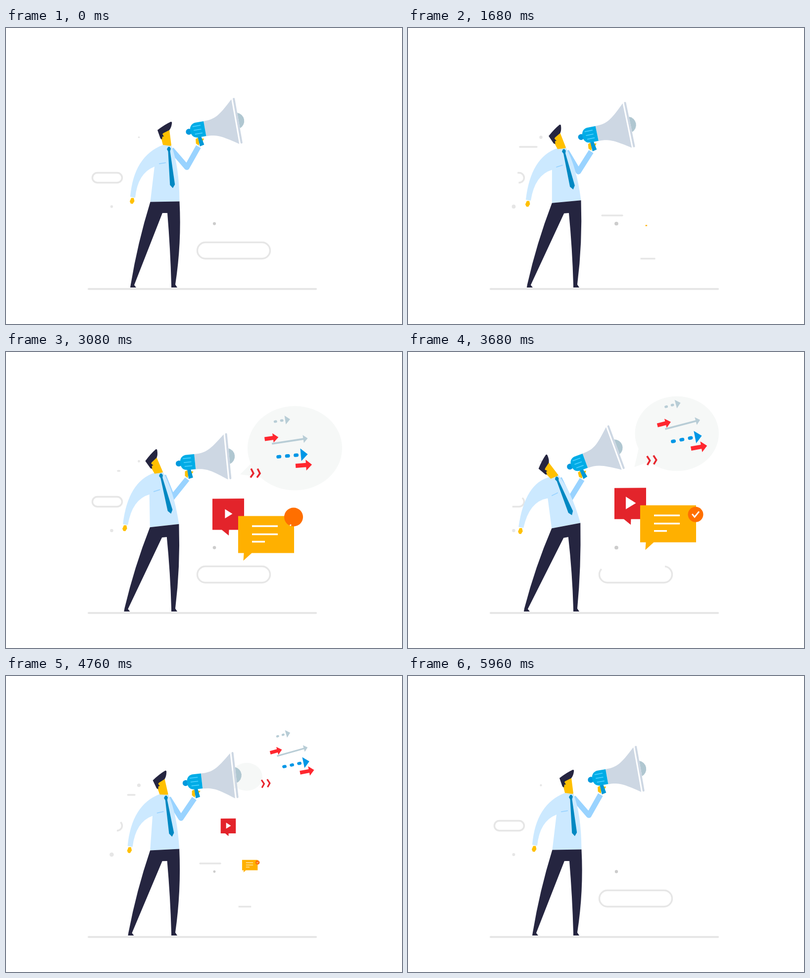
An HTML page with a canvas for the animation above (6000 ms loop, 800x600 px).

```html
<!DOCTYPE html>
<html>
<head>
<meta charset="utf-8">
<style>
html, body { margin: 0; width: 100%; height: 100%; overflow: hidden; background: #fff; }
canvas { display: block; }
</style>
</head>
<body>
<canvas id="stage" width="800" height="600"></canvas>
<script>
const c = document.getElementById('stage').getContext('2d');
const LOOP = 6000, RAD = Math.PI / 180;
const LINE = '#e6e6e6', NAVY = '#252540', SKIN = '#ffc000', SHIRT = '#cce9ff', SLEEVE = '#99d3ff',
  BLUE = '#00ace6', DEEP = '#0088c2', STEEL = '#cdd7e3', MIST = '#b8cdd6', RED = '#e3242b', HOT = '#ff272f';

function ramp(t, from, to) {
  const u = Math.min(1, Math.max(0, (t - from) / (to - from)));
  return u * u * (3 - 2 * u);
}
// Rises over the first span, falls over the second, and so on.
function wave(t, ...spans) {
  return spans.reduce((sum, [from, to], i) => sum + (i % 2 ? -1 : 1) * ramp(t, from, to), 0);
}
const sway = t => wave(t, [2560, 3080], [3080, 3860]);

function turn(x, y, deg) {
  const s = Math.sin(deg * RAD), k = Math.cos(deg * RAD);
  return [x * k - y * s, x * s + y * k];
}
function fill(color, d) { c.fillStyle = color; c.fill(new Path2D(d)); }
function stroke(color, width, d, cap = 'butt') {
  c.strokeStyle = color; c.lineWidth = width; c.lineCap = cap; c.stroke(new Path2D(d));
}
function dot(color, x, y, r) {
  c.fillStyle = color; c.beginPath(); c.arc(x, y, Math.max(0, r), 0, 7); c.fill();
}
function at(x, y, deg, scale, draw) {
  if (scale <= 0.001) return;
  c.save();
  c.translate(x, y); c.rotate(deg * RAD); c.scale(scale, scale);
  draw();
  c.restore();
}

// Rounded outline drawn from fraction s to e, starting at the middle of its top or bottom.
function pill(x, y, straight, r, dir, s, e) {
  if (e - s < 0.004) return;
  const length = 2 * straight + 2 * Math.PI * r, half = dir * straight / 2;
  c.save();
  if (e - s < 0.999) {
    c.setLineDash([(e - s) * length, length * 2]);
    c.lineDashOffset = -s * length;
  }
  stroke(LINE, 3.4, `M${x},${y}h${half}a${r},${r} 0 0 1 0,${2 * r * dir}h${-2 * half}a${r},${r} 0 0 1 0,${-2 * r * dir}Z`);
  c.restore();
}
function bar(right, y, width, s, e) {
  if (e - s > 0.01) stroke(LINE, 3.4, `M${right - width * s},${y}H${right - width * e}`, 'round');
}

function scenery(t) {
  stroke(LINE, 4, 'M167,529H626', 'round');

  const erased = u => wave(u, [560, 1100], [1400, 2200], [3240, 3860], [4520, 5370]);
  pill(204.5, 313.5, 40, 10, -1, .86 * erased(t), 1 - .14 * erased(t - 200));
  pill(460, 434.5, 114, 16.5, 1,
    .44 * wave(t, [640, 1500], [1500, 2280], [3240, 4250], [4500, 5780]),
    1 - .53 * wave(t, [900, 1500], [2200, 2900], [3240, 4250], [5150, 5800]));

  const reset = [3300, 3301];
  bar(260, 241, 34, wave(t, [2600, 3200], reset, [5300, 5850]), wave(t, [500, 1100], reset, [4500, 5100]));
  bar(433, 380, 41, wave(t, [2350, 2800], reset, [5300, 5800]), wave(t, [200, 750], reset, [4200, 4600]));

  const beat = Math.abs(Math.sin(Math.PI * t / 750));
  dot(LINE, 213.5, 362, 2.7 + 1.8 * beat);
  dot(LINE, 268.5, 221.5, 1.8 + 2 * beat);
  dot('#ccc', 421, 396.5, 3.1 - .9 * Math.sin(6 * Math.PI * t / LOOP));
}

function megaphone() {
  fill('#b0c7d1', 'M2,-16A17,17 0 0 1 2,16Z');
  fill(STEEL, 'M-68,-11C-44,-11 -36,-16 -5,-45L-5,47C-36,26 -46,20 -68,20Z');
  stroke(STEEL, 4, 'M0,-45V45', 'round');
  fill(SKIN, 'M-90,22L-85,20L-84,30L-86,36L-91,31ZM-78,23L-73,24L-77,29Z');
  fill('#0099d6', 'M-85,19L-78,19L-75,36L-84,38Z');
  dot('#0099dd', -101, 5, 6);
  fill(BLUE, 'M-68,-11H-86Q-98,-9 -98,5Q-97,19.6 -84,19.6H-68Z');
  stroke('#4dd0ff', 1.8, 'M-91,-4h15m-14,8h14m-13,8h14', 'round');
}

function head() {
  fill(SKIN, 'M-4,-32L0,0L-2,1L-17,-1L-20,-13L-19,-24Z');
  fill(NAVY, 'M-28,-31Q-14,-42 -1,-48Q2,-48 1,-44Q0,-36 -4,-31L-16,-25L-18,-23L-15,-18L-18,-18L-19,-12L-22,-14Z');
}

function legs(lean, left, right) {
  const ahead = Math.max(lean, 0), behind = Math.min(lean, 0);
  const lx = 251 + Math.max(1.4 * behind, -17), rx = 334 + .5 * ahead;
  const outer = 355 + 1.6 * ahead + .3 * behind, inner = 332 + 1.8 * ahead;
  fill(NAVY, `M${left}L${right}Q${outer},436 ${rx + 8},520l4,6h-12v-6` +
    `Q${inner},448 ${326 + .13 * lean},375L${316 + .1 * lean},${375 - .1 * lean}L${lx + 8},521l4,5H${lx}l1,-6` +
    `Q${(lx + 1 + left[0]) / 2 - 6},436 ${left}Z`);
}

function man(t) {
  const forward = wave(t, [0, 920], [920, 2080], [4500, 5160], [5000, 5940]);
  const back = wave(t, [920, 2080], [4500, 5160]);
  const settle = wave(t, [3860, 4320], [4500, 5160]);
  const lean = 19 * forward - 18 * back + 9 * sway(t) + 3 * settle;
  const aim = -10 + 27 * forward - 12.4 * back + 16.8 * sway(t) + 3.6 * settle;

  // The torso bends at the waist and shortens a little, more so when leaning back.
  const squash = 1 - .0035 * Math.abs(lean) + .002 * lean;
  const body = (x, y) => {
    const [dx, dy] = turn(x, y * squash, lean);
    return [321 + dx, 352 + dy];
  };
  const [wx, wy] = turn(29.5, 0, .57 * lean - 1), mid = 321 + .1 * lean;
  const left = [mid - wx, 352 - wy], right = [mid + wx, 352 + wy];
  const neck = body(13, -114), knot = body(8, -107), shoulder = body(13, -106);

  // The megaphone swings around the neck; the front arm reaches its grip with two equal bones.
  const reach = 143 + .8 * Math.min(lean, 0);
  const [ox, oy] = turn(reach, 0, aim - 10.5 + .47 * Math.abs(lean) + .18 * lean);
  const mx = neck[0] + ox, my = neck[1] + oy;
  const [gx, gy] = turn(-87, 38, aim);
  const dx = mx + gx - shoulder[0], dy = my + gy - shoulder[1], d = Math.hypot(dx, dy);
  const rise = Math.sqrt(Math.max(0, 48 * 48 - d * d / 4)) / d;
  c.lineJoin = 'round';
  stroke(SLEEVE, 11, `M${shoulder}l${dx / 2 - dy * rise},${dy / 2 + dx * rise}L${mx + gx},${my + gy}`);
  c.lineJoin = 'miter';

  const hx = 251 + 1.65 * lean, hy = 342 - .75 * lean;
  at(hx, hy, 0, 1, () => fill(SKIN, 'M2,2.5L7,2.5L8.5,9L5,14.5L1,14L-1,9.5Z'));
  fill(SHIRT, `M${body(-4, -115)}Q${258 + 1.3 * lean},${260 - .3 * lean} ${hx},${hy}l10,2` +
    `Q${266 + 1.25 * lean},${294 - .5 * lean} ${body(-21, -71)}L${left}L${right}Q${body(29, -72)} ${neck}Z`);
  legs(lean, left, right);

  at(...neck, 1.8 * lean, 1, head);
  at(...knot, lean - 5.7, 1, () => {
    fill(DEEP, 'M-4,0L-1,-4L2,-4L4,0L2,5L5,73L0,80L-5,73L-2,5Z');
    stroke(SLEEVE, 1.8, 'M-22,28L-9.6,27.2', 'round');
  });
  at(mx, my, aim, 1, megaphone);
}

function speech(t) {
  const q = sway(t), grow = wave(t, [1950, 2650], [4500, 4950]);
  at(455 + 18 * q, 231 + 17 * q, 0, grow, () => {
    const x = 82 + 28.5 * q, y = -70 + 17 * q, r = 83 + 12.5 * q;
    c.fillStyle = '#f6f8f7';
    c.beginPath(); c.ellipse(x, y, r, r * .895, 0, 0, 7); c.fill();
    fill('#f6f8f7', `M0,0L${x - .9 * r},${y + .3 * r}L${x - .58 * r},${y + .64 * r}Z`);
  });
}

function arrow(color, width, length, tip, half, dash = []) {
  return () => {
    c.setLineDash(dash);
    stroke(color, width, `M${-length},0H${1 - tip}`, dash.length ? 'round' : 'butt');
    fill(color, `M0,0L${-tip},${-half}V${half}Z`);
  };
}
function chevrons() {
  stroke('#e8262d', 3.6, 'M-6,-9L0,0L-5,9M7,-10.5L13,-1.5L8,7.5');
}
// In order of flight: tip x, y and angle, measured from the middle of the bubble.
const signs = [
  [62, 29, -11, arrow(HOT, 8.5, 33, 12, 11)],
  [-53, 61, 0, chevrons],
  [-12, -18, -15, arrow(HOT, 8, 28, 11, 9.5)],
  [7, -57, -16, arrow(MIST, 5, 31, 10, 9, [2, 11])],
  [51, 9, -12, arrow('#0097e6', 7, 60, 14, 12.8, [3, 14.5])],
  [47, -23, -15.7, arrow(MIST, 3.6, 73, 9, 8)]
];
function arrows(t) {
  const q = sway(t), bob = wave(t, [2280, 2600], [3860, 4320]);
  const size = 1 - ramp(t, 4700, 4980), leave = 28 * ramp(t, 4450, 4700);
  at(540 + 20 * q + leave, 165 + 37 * q - 10 * bob, 7 * q, size, () => {
    signs.forEach(([x, y, deg, draw], i) => {
      const begin = 1850 + 70 * i;
      at(x - 90 * (1 - ramp(t, begin, begin + 600)), y, deg, ramp(t, begin, begin + 150), draw);
    });
  });
}

function cards(t) {
  const sink = 25 * sway(t) + 4 * (1 - ramp(t, 2280, 2560));
  at(449, 304 + sink, 0, wave(t, [1950, 2420], [4560, 4950]), () => {
    fill(RED, 'M-32,-31.5L32,-32V31.5H1.5L1,43L-13,31.5H-32Z');
    at(0, -1, 0, ramp(t, 2650, 3300), () => fill('#fff', 'M-9,-13L11.5,0L-9,12.5Z'));
  });
  at(480, 398 + sink, 0, wave(t, [1620, 2200], [4500, 4900]), () => {
    fill('#ffb000', 'M-11,-90.5H102V-15.5H16.5L-0.5,0L0.5,-15.5H-11Z');
    const w = 52 * ramp(t, 2270, 2950), tick = ramp(t, 3000, 3400);
    if (w > 0) stroke('#fff', 3.5, `M17,-70h${w}M17,-53.5h${w}M17,-38.5h${w / 2}`);
    dot('#ff6f00', 101, -90 + 18 * ramp(t, 3000, 3450), 19 * ramp(t, 2150, 3000) - 3.5 * ramp(t, 3080, 3450));
    if (tick > .02) {
      c.setLineDash([24 * tick, 50]);
      stroke('#fff', 3, 'M94,-73L99,-67L108,-78');
    }
  });
}

function frame(t) {
  c.fillStyle = '#fff';
  c.fillRect(0, 0, 800, 600);
  for (const layer of [scenery, speech, cards, arrows, man]) layer(t);
}
const start = performance.now();
(function tick() {
  frame((performance.now() - start) % LOOP);
  requestAnimationFrame(tick);
})();
</script>
</body>
</html>
```
